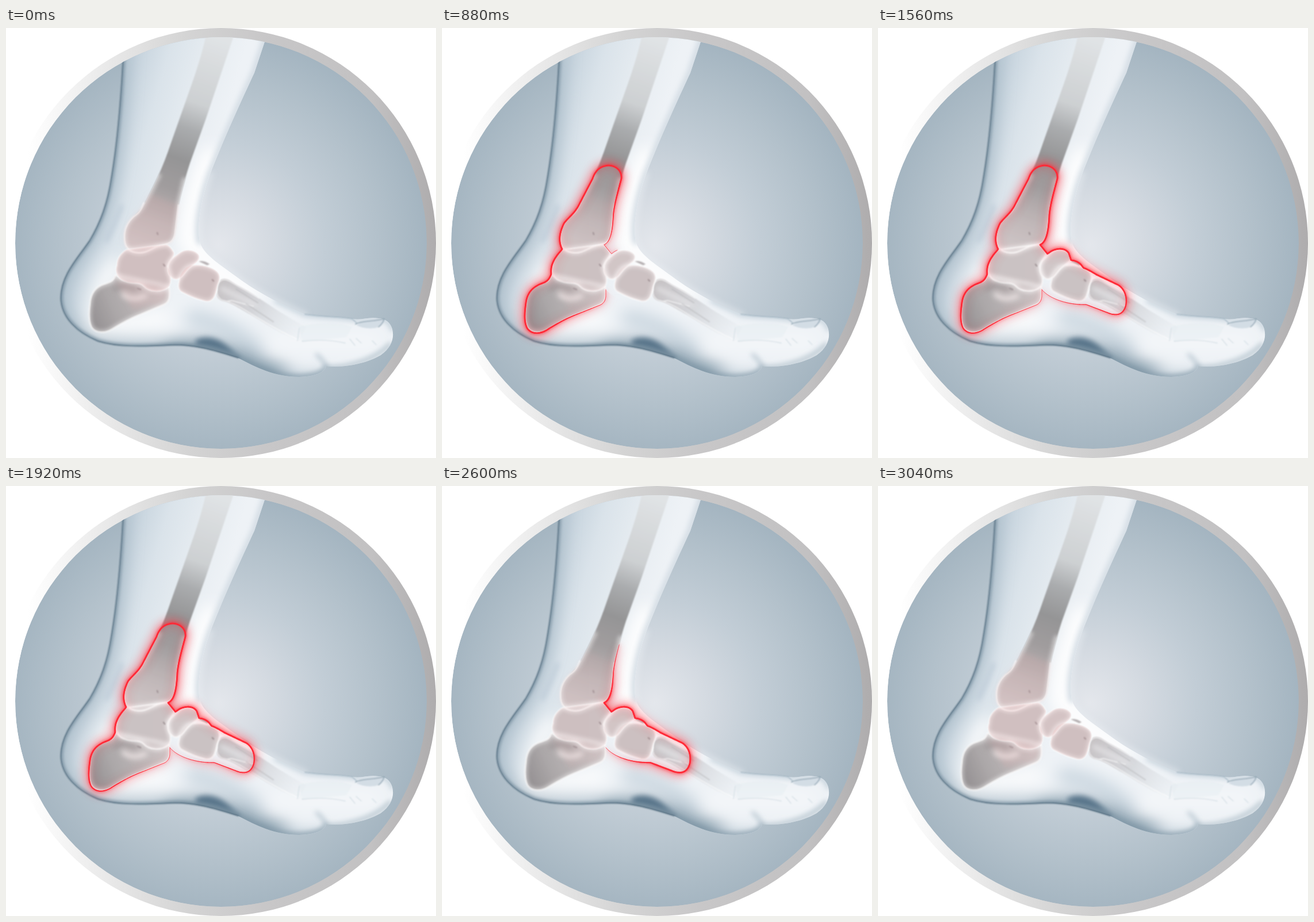
An HTML page with a canvas for the animation above (3360 ms loop, 748x748 px).

```html
<!DOCTYPE html>
<html lang="en">
<head>
<meta charset="utf-8">
<title>Ankle outline</title>
<style>
  html, body { margin: 0; width: 100%; height: 100%; overflow: hidden; background: #fff; }
  svg, canvas { position: absolute; left: 0; top: 0; width: 748px; height: 748px; }
</style>
</head>
<body>
<svg viewBox="0 0 748 748" fill="none" stroke-linecap="round" stroke-linejoin="round">
  <defs>
    <linearGradient id="ring">
      <stop offset=".05" stop-color="#fff"/><stop offset=".2" stop-color="#ededed"/>
      <stop offset=".42" stop-color="#d4d4d4"/><stop offset=".6" stop-color="#c8c7c8"/>
      <stop offset=".85" stop-color="#c2c1c2"/><stop offset="1" stop-color="#aeacad"/>
    </linearGradient>
    <radialGradient id="disc" gradientUnits="userSpaceOnUse" cx="370" cy="378" r="368">
      <stop offset="0" stop-color="#e4e7ec"/><stop offset=".25" stop-color="#d4dae1"/>
      <stop offset=".5" stop-color="#c2cdd6"/><stop offset=".75" stop-color="#b3c1cb"/>
      <stop offset="1" stop-color="#a3b4c0"/>
    </radialGradient>
    <linearGradient id="skin" gradientUnits="userSpaceOnUse" x1="170" y1="240" x2="345" y2="290">
      <stop offset="0" stop-color="#c6d3dd"/><stop offset=".3" stop-color="#dae3ea"/>
      <stop offset=".65" stop-color="#e6ecf1"/><stop offset="1" stop-color="#eef2f6"/>
    </linearGradient>
    <linearGradient id="shin" gradientUnits="userSpaceOnUse" x1="370" y1="20" x2="240" y2="388">
      <stop offset="0" stop-color="#e0e3e5"/><stop offset=".3" stop-color="#cdd0d2"/>
      <stop offset=".42" stop-color="#aaacae"/><stop offset=".56" stop-color="#959596"/>
      <stop offset=".7" stop-color="#a19d9e"/><stop offset=".86" stop-color="#bfb8b9"/>
      <stop offset="1" stop-color="#cfc7c8"/>
    </linearGradient>
    <linearGradient id="heel" gradientUnits="userSpaceOnUse" x1="150" y1="515" x2="285" y2="455">
      <stop offset="0" stop-color="#949092"/><stop offset=".3" stop-color="#aba7a8"/>
      <stop offset="1" stop-color="#cfc8c9"/>
    </linearGradient>
    <linearGradient id="ray" gradientUnits="userSpaceOnUse" x1="370" y1="445" x2="520" y2="535">
      <stop offset="0" stop-color="#c6c2c4"/><stop offset=".4" stop-color="#d2d3d7"/>
      <stop offset="1" stop-color="#e2e8ed" stop-opacity=".1"/>
    </linearGradient>
    <filter id="soft1" x="-30%" y="-30%" width="160%" height="160%"><feGaussianBlur stdDeviation="1.1"/></filter>
    <filter id="soft3" x="-40%" y="-40%" width="180%" height="180%"><feGaussianBlur stdDeviation="3"/></filter>
    <filter id="soft5" x="-50%" y="-50%" width="200%" height="200%"><feGaussianBlur stdDeviation="5"/></filter>
    <filter id="soft14" x="-60%" y="-60%" width="220%" height="220%"><feGaussianBlur stdDeviation="14"/></filter>
    <clipPath id="round"><circle cx="374" cy="374" r="358"/></clipPath>
    <path id="back" d="M205 0 203 60C199 130 194 195 183 260 176 306 164 338 145 370 124 401 95 430 95 470 96 505 125 531 160 545 195 556 240 554 285 552 325 550 360 560 404 574"/>
    <path id="front" d="M458 0 432 78C410 125 378 195 355 254 342 290 331 340 337 371"/>
    <path id="foot" d="M205 0 203 60C199 130 194 195 183 260 176 306 164 338 145 370 124 401 95 430 95 470 96 505 125 531 160 545 195 556 240 554 285 552 325 550 360 560 404 574 435 590 467 607 510 607 535 606 554 601 557 588 592 592 630 582 652 569 670 556 676 540 672 524 669 513 661 506 648 505 630 502 618 509 602 506 580 502 550 503 520 498 475 480 430 455 400 432 370 410 342 393 337 371 331 340 342 290 355 254 378 195 410 125 432 78L458 0Z"/>
    <clipPath id="inFoot"><use href="#foot"/></clipPath>
    <path id="calcaneus" d="M190 430C188 440 181 442 172 445 155 450 147 463 146 480 144 495 143 510 149 521 156 531 172 532 186 523 204 512 219 504 235 498L275 481C286 476 285 465 284 450Z"/>
    <path id="talus" d="M209 386C200 392 193 400 193 413 188 427 197 438 209 441 220 446 232 440 240 449 250 460 272 460 283 450 290 440 285 425 281 415 283 405 293 399 292 391 289 385 284 378 278 377Z"/>
    <path id="tibia" d="M349 0 347 17C338 55 328 84 318 112L287 200C277 230 266 257 250 288 241 308 234 318 222 328 211 338 205 351 206 366 206 382 215 390 230 391 246 392 256 381 270 378 286 376 292 370 294 358 297 340 297 325 300 308 305 284 312 260 320 235L347 160 395 17V0Z"/>
    <path id="ankleEnd" d="M266 257C256 276 241 308 234 316L222 328C211 338 205 351 206 366 206 382 215 390 230 391 246 392 256 381 270 378 286 376 292 370 294 358L300 308 310 264"/>
    <path id="navicular" d="M282 416C282 404 293 398 303 391 314 383 330 387 335 395 339 405 326 411 319 417 311 424 308 434 297 437 286 437 281 426 282 416Z"/>
    <path id="cuneiform" d="M302 437C304 426 312 414 324 413 342 411 359 417 367 424 375 432 370 441 367 451 364 465 361 477 347 475 333 472 317 465 306 459 298 454 300 446 302 437Z"/>
    <path id="metatarsal" d="M368 455C367 440 375 433 387 438 405 450 424 458 440 470 470 490 495 506 522 520L512 545C480 533 455 517 428 500 405 488 395 479 378 475 367 472 365 465 368 455Z"/>
    <path id="outline" d="M285 455 285 467Q284 478 275 482L235 498C219 504 204 512 186 523 172 533 156 534 148 522 142 510 144 493 146 478 148 463 155 452 172 445 181 442 186 439 190 428 188 412 196 399 209 385 202 371 204 357 212 340 220 329 232 322 240 304L262 262C268 244 279 240 290 239 304 240 313 249 312 262 306 285 300 305 298 325 297 345 295 372 282 377L295 393C305 383 325 380 332 392L336 404Q350 405 357 417C365 420 372 424 380 429L418 447C429 454 434 468 431 483 427 497 418 501 404 497L362 481C334 482 300 473 285 455"/>
    <clipPath id="inBones">
      <use href="#calcaneus"/><use href="#talus"/><use href="#tibia"/><use href="#navicular"/><use href="#cuneiform"/>
    </clipPath>
  </defs>

  <circle cx="374" cy="374" r="374" fill="url(#ring)"/>
  <g clip-path="url(#round)">
    <circle cx="374" cy="374" r="358" fill="url(#disc)"/>
    <path d="M355 254C342 290 331 340 337 371 342 393 370 410 400 432 430 455 475 480 520 498" stroke="#eef2f5" stroke-opacity=".45" stroke-width="10" filter="url(#soft5)"/>
    <use href="#foot" fill="url(#skin)"/>

    <g clip-path="url(#inFoot)">
      <g filter="url(#soft14)">
        <use href="#back" stroke="#a2b5c2" stroke-width="18"/>
        <path d="M290 566C340 550 400 575 435 592L480 608" stroke="#7d95a5" stroke-width="38"/>
        <path d="M480 615H560" stroke="#b3c3ce" stroke-width="26"/>
        <path d="M325 505Q390 515 435 560" stroke="#c6d3dd" stroke-width="26"/>
        <path d="M355 225C330 280 316 330 318 372Q365 424 425 464" stroke="#fff" stroke-width="34"/>
        <path d="M190 415Q150 455 160 520L270 505" stroke="#fff" stroke-width="30" stroke-opacity=".8"/>
        <path d="M470 545 640 545" stroke="#fff" stroke-width="20" stroke-opacity=".5"/>
      </g>
      <g filter="url(#soft5)">
        <use href="#front" stroke="#cdd8e0" stroke-width="12" stroke-opacity=".8"/>
        <path d="M404 574C435 590 467 607 510 607 535 606 554 601 557 588" stroke="#7b93a3" stroke-width="6"/>
        <path d="M330 543Q355 531 382 551L408 574Q370 558 330 552Z" fill="#58748a"/>
        <path d="M557 591C600 591 645 575 668 550" stroke="#a0b3bf" stroke-width="5"/>
        <path d="M470 474 520 498C550 503 580 502 602 506 618 509 630 502 648 505 661 506 669 513 672 524" stroke="#c0ced8" stroke-width="7"/>
        <path d="M175 370Q190 340 201 310" stroke="#b2c2d0" stroke-width="7" stroke-opacity=".6"/>
        <path d="M555 592Q556 580 540 568" stroke="#9fb2bf" stroke-width="4"/>
      </g>
      <use href="#back" stroke="#6d8596" stroke-width="6" filter="url(#soft3)"/>
    </g>
    <use href="#back" stroke="#516b7d" stroke-width="1.4" filter="url(#soft1)"/>

    <use href="#tibia" fill="url(#shin)" filter="url(#soft1)"/>
    <use href="#metatarsal" fill="url(#ray)" filter="url(#soft1)"/>
    <g filter="url(#soft1)" stroke="#fff" stroke-width="2" stroke-opacity=".85">
      <path d="M333 406Q343 401 356 411L350 414Z" fill="#b8b3b5"/>
      <use href="#calcaneus" fill="url(#heel)"/>
      <use href="#talus" fill="#cac3c4"/>
      <path d="M240 304C234 318 232 322 222 328 211 338 205 351 206 366 206 382 215 390 230 391 246 392 256 381 270 378 286 376 292 370 294 358L300 308"/>
      <use href="#cuneiform" fill="#c9c3c4"/>
      <use href="#navicular" fill="#cfc8c9"/>
      <path d="M392 474C378 478 367 471 367 459 366 441 376 434 388 440L440 470M392 474 430 484M378 474C410 480 440 512 508 542" stroke-opacity=".6"/>
    </g>
    <g clip-path="url(#inBones)" stroke="#fff" stroke-width="8" stroke-opacity=".45">
      <g filter="url(#soft3)">
        <use href="#calcaneus"/><use href="#talus"/><use href="#ankleEnd"/>
        <use href="#cuneiform"/><use href="#navicular"/>
      </g>
    </g>
    <g filter="url(#soft5)">
      <path d="M205 464Q220 476 242 466" stroke="#eae4e4" stroke-width="8"/>
      <path d="M188 455Q204 443 225 454" stroke="#969092" stroke-width="5"/>
      <path d="M375 453 435 482" stroke="#ecebed" stroke-width="5"/>
    </g>
    <g filter="url(#soft1)">
      <path d="M229 453 234 455M274 411 276 414M359 438 361 440M263 356 264 359" stroke="#a0979a" stroke-width="2.6"/>
      <path d="M400 454 438 478M418 480 465 511" stroke="#b4b3b7" stroke-width="2.2" stroke-opacity=".45"/>
    </g>

    <g id="tint" fill="#e9a9ac" fill-opacity=".18">
      <use href="#talus"/><use href="#navicular"/><use href="#cuneiform"/>
      <path d="M250 288C241 308 234 318 222 328 205 345 203 365 209 380 220 396 250 390 270 378 292 376 293 360 300 308Z" filter="url(#soft5)"/>
      <path d="M190 440Q225 435 283 457L275 478 220 490Z" filter="url(#soft5)"/>
    </g>

    <g filter="url(#soft1)">
      <path d="M510 520Q545 510 585 515L602 520 592 538 515 545Z" fill="#dce5eb" fill-opacity=".25"/>
      <path d="M510 522 507 544M515 545Q555 540 590 548M598 541 607 552M609 540 618 548M637 544 644 551" stroke="#d6e0e6" stroke-width="1.4"/>
      <path d="M610 517C618 509 637 511 658 506Q654 520 641 522 622 524 610 517Z" fill="#d3dde5"/>
      <path d="M608 515C618 509 637 511 658 506Q655 515 648 520" stroke="#8ba0af" stroke-width="1.5"/>
      <path d="M520 498C550 503 580 502 602 506L610 513" stroke="#a4b7c4" stroke-width="1.5"/>
    </g>
  </g>
</svg>
<canvas width="748" height="748"></canvas>

<script>
const LOOP = 3360, STEP = 40, SAMPLES = 420, TAPER = 0.2;
const view = document.querySelector('canvas');
const ctx = view.getContext('2d');
const lineLayer = view.cloneNode();
const line = lineLayer.getContext('2d');
const tint = document.getElementById('tint');
const outline = document.getElementById('outline');
const interior = new Path2D(outline.getAttribute('d'));
const length = outline.getTotalLength();
const points = Array.from({ length: SAMPLES + 1 }, (_, i) => outline.getPointAtLength(length * i / SAMPLES));

const progress = (t, start, end) => Math.min(1, Math.max(0, (t - start) / (end - start)));

// The visible stretch runs from tail to head and thins toward both ends.
function drawLine(tail, head) {
  line.clearRect(0, 0, 748, 748);
  line.strokeStyle = '#ff2b38';
  line.lineCap = 'round';
  const first = Math.round(tail * SAMPLES), last = Math.round(head * SAMPLES);
  for (let i = first; i < last; i++) {
    const along = (i + 0.5 - first) / (last - first);
    const weight = Math.min(1, Math.min(along, 1 - along) / TAPER) ** 1.4;
    line.lineWidth = 0.6 + 2.1 * weight;
    line.beginPath();
    line.moveTo(points[i].x, points[i].y);
    line.lineTo(points[i + 1].x, points[i + 1].y);
    line.stroke();
  }
}

function stamp(blur) {
  ctx.filter = blur ? `blur(${blur}px)` : 'none';
  ctx.drawImage(lineLayer, 0, 0);
}

// The glow spreads outward and is mostly hidden inside the outline.
function composeGlow() {
  ctx.clearRect(0, 0, 748, 748);
  [10, 10, 6, 2.5].forEach(stamp);
  ctx.filter = 'none';
  ctx.globalCompositeOperation = 'destination-out';
  ctx.fillStyle = 'rgba(0, 0, 0, .65)';
  ctx.fill(interior);
  ctx.globalCompositeOperation = 'source-over';
  stamp(0);
}

function frame() {
  const t = Math.floor(performance.now() % LOOP / STEP) * STEP;
  const head = progress(t, 220, 1200);
  const tail = progress(t, 2080, 3040);
  drawLine(tail, head);
  composeGlow();
  tint.setAttribute('opacity', 1 - 0.8 * (head - tail));
  requestAnimationFrame(frame);
}
frame();
</script>
</body>
</html>
```
